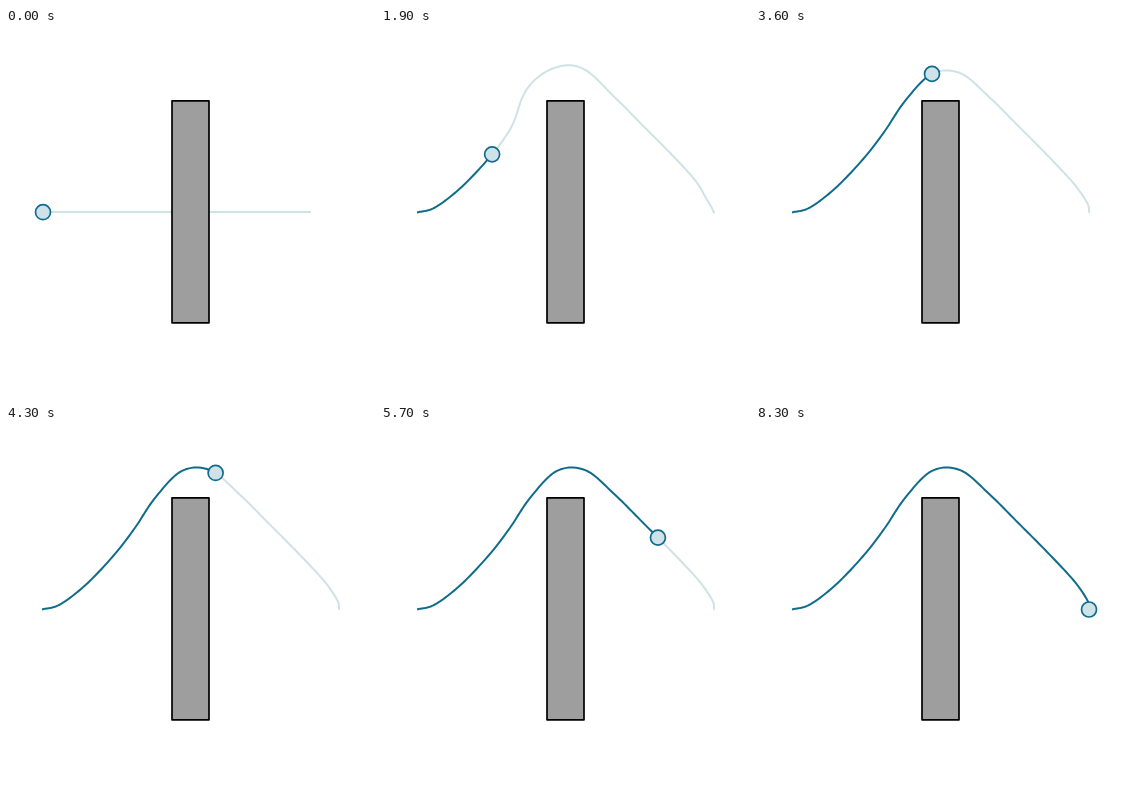
An HTML page that plays this animation: 369 by 369 pixels, repeating every 8.5 s.

```html
<!DOCTYPE html>
<html lang="en">
<head>
<meta charset="utf-8">
<title>Path around an obstacle</title>
<style>
  html, body { margin: 0; height: 100%; overflow: hidden; background: #fff; }
  svg { display: block; width: 100%; height: 100%; }
  path { fill: none; stroke-width: 2; stroke-linejoin: round; }
</style>
</head>
<body>
<svg viewBox="0 0 369 369">
  <path id="plan" stroke="#cfe2e6"/>
  <path id="trail" stroke="#0f6c8b" stroke-linecap="square"/>
  <rect x="166" y="72.8" width="37" height="222" fill="#9e9e9f" stroke="#000" stroke-width="1.7" stroke-linejoin="round"/>
  <circle id="robot" r="7.5" fill="#cfe2ea" stroke="#0f6c8b" stroke-width="1.7"/>
</svg>
<script>
const LOOP = 8500, STEP = 100, LAST = 83, HORIZON = 84;
const REPLAN_START = 19, REPLAN_END = 28;

// Key points of the drive, evenly spaced in time.
const SPACING = 6;
const keys = [
  [37, 184.2], [54, 179.5], [79.5, 160], [107.2, 131], [128.5, 103.5],
  [149.3, 72.6], [176, 45.9], [204.8, 45.4], [233.7, 69.5], [262.3, 98],
  [291.3, 127.2], [317.7, 155.5], [331.2, 175], [333, 183.5], [333, 184.5]
];

const clamp = (v, lo, hi) => Math.min(hi, Math.max(lo, v));
const bump = (step, center) => Math.exp(-(((step - center) / 5) ** 2));

// Catmull-Rom position at a given step.
function drivenAt(step) {
  const s = step / SPACING, i = Math.floor(s), u = s - i;
  const [a, b, c, d] = [-1, 0, 1, 2].map(k => keys[clamp(i + k, 0, keys.length - 1)]);
  return b.map((p, j) => p + u / 2 * (c[j] - a[j]
    + u * (2 * a[j] - 5 * p + 4 * c[j] - d[j] + u * (3 * (p - c[j]) + d[j] - a[j]))));
}

// The early plan swings wide at the corner, over the top and before the goal,
// then settles onto the driven path.
function plannedAt(step, now) {
  const [x, y] = drivenAt(step);
  const settled = clamp((now - REPLAN_START) / (REPLAN_END - REPLAN_START), 0, 1) ** 3;
  const ahead = clamp((step - now) / 3, 0, 1);
  const swing = (1 - settled) * ahead;
  const corner = bump(step, 32.5), top = bump(step, 40), goal = bump(step, 71);
  return [
    x - swing * (11 * corner + 2 * top + 4 * goal),
    y - swing * (2 * corner + 5 * top + goal)
  ];
}

function trace(from, to, locate) {
  const points = [];
  for (let s = from; s < to; s += 0.5) points.push(locate(s));
  points.push(locate(to));
  return "M" + points.map(p => p.map(v => v.toFixed(2)).join()).join("L");
}

const plan = document.getElementById("plan");
const trail = document.getElementById("trail");
const robot = document.getElementById("robot");

function draw(time) {
  const now = Math.min(LAST, Math.floor(time % LOOP / STEP));
  const [x, y] = drivenAt(now);
  plan.setAttribute("d", now ? trace(now, HORIZON, s => plannedAt(s, now)) : "M37,184H305");
  trail.setAttribute("d", now ? trace(0, now, drivenAt) : "");
  robot.setAttribute("cx", x);
  robot.setAttribute("cy", y);
}

const began = performance.now();
function tick() {
  draw(performance.now() - began);
  requestAnimationFrame(tick);
}
tick();
</script>
</body>
</html>
```
